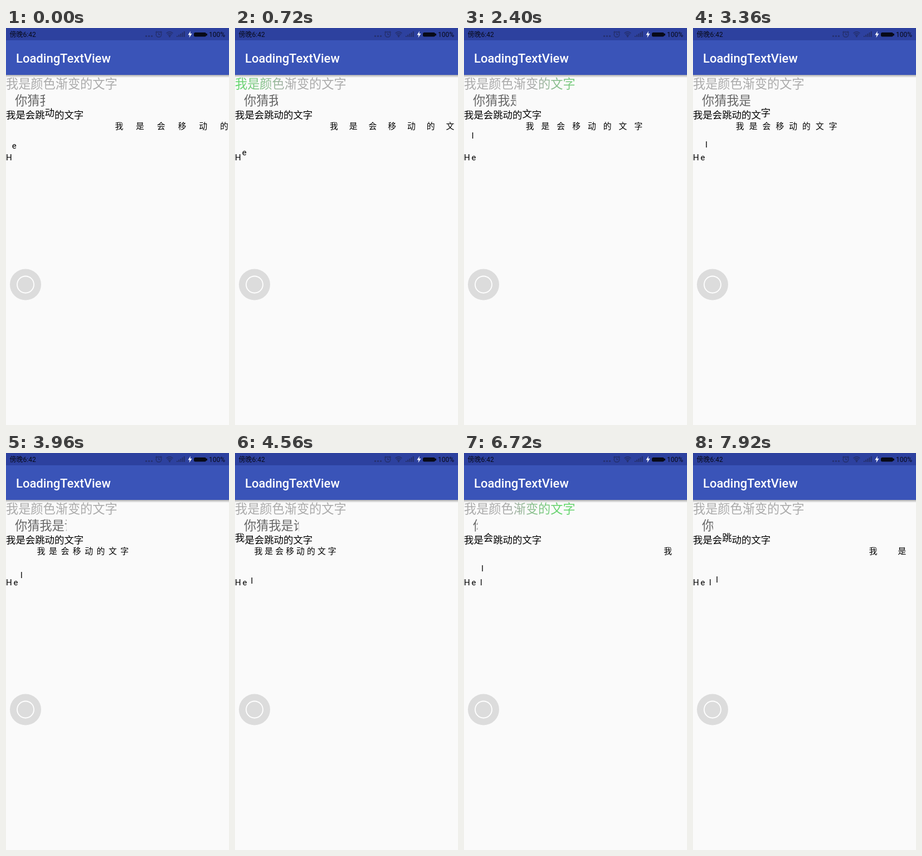
These frames come from a looping animation (400 px wide and 711 px high, 8 s). An HTML page:

```html
<!DOCTYPE html>
<html lang="zh-CN">
<head>
<meta charset="utf-8">
<title>LoadingTextView</title>
<style>
  html, body { margin: 0; width: 100%; height: 100%; overflow: hidden; background: #fafafa; }
  svg { display: block; width: 100vw; height: 100vh; }
  text { font-family: Roboto, "Noto Sans CJK SC", "Noto Sans CJK", sans-serif; white-space: pre; }
</style>
</head>
<body>
<svg viewBox="0 0 400 711">
  <defs>
    <linearGradient id="shadow" x2="0" y2="1">
      <stop stop-color="#000" stop-opacity=".3"/>
      <stop offset="1" stop-color="#000" stop-opacity="0"/>
    </linearGradient>
    <linearGradient id="shine" gradientUnits="userSpaceOnUse" y1="0" y2="0">
      <stop stop-color="#aaa"/>
      <stop offset=".5" stop-color="#5fd968"/>
      <stop offset="1" stop-color="#aaa"/>
    </linearGradient>
    <clipPath id="revealClip"><rect id="reveal" y="114" height="32"/></clipPath>
    <clipPath id="dropClip"><rect y="186" width="400" height="60"/></clipPath>
  </defs>

  <rect width="400" height="711" fill="#fafafa"/>
  <rect y="84" width="400" height="5" fill="url(#shadow)"/>
  <rect width="400" height="84" fill="#3a54b8"/>
  <rect width="400" height="22" fill="#2d419f"/>
  <text x="18" y="62" font-size="22" font-weight="500" fill="#fff">LoadingTextView</text>

  <!-- status bar -->
  <g font-size="12" fill="#080a18">
    <text x="6.5" y="16">傍晚6:42</text>
    <text x="364" y="16">100%</text>
    <rect x="337" y="8" width="22" height="7.5" rx="2.5"/>
    <rect x="359" y="10" width="2" height="3.5"/>
  </g>
  <path d="M331 5.5l-4.5 7h3l-1 5 5-7.5h-3.2z" fill="#fff"/>
  <g fill="#25306d">
    <circle cx="251.5" cy="14.5" r="1.6"/>
    <circle cx="256.5" cy="14.5" r="1.6"/>
    <circle cx="261.5" cy="14.5" r="1.6"/>
    <path d="M306 16v-2h2v2zm3.2 0v-4h2v4zm3.2 0v-6h2v6zm3.2 0v-8h2v8zm3.2 0v-10h2v10z"/>
    <circle cx="293.5" cy="15" r="1.5"/>
  </g>
  <g fill="none" stroke="#25306d" stroke-width="1.4">
    <circle cx="274" cy="11.5" r="4.8"/>
    <path d="M274 8.5v3.3h2.5M268.3 8l2.5-2.3M279.7 8l-2.5-2.3"/>
    <path d="M287.5 9.5q6-5.5 12 0M289.3 11.6q4.2-3.8 8.4 0M291 13.5q2.5-2 5 0"/>
  </g>

  <text x="0" y="108.3" font-size="22.2" fill="url(#shine)">我是颜色渐变的文字</text>
  <text x="16" y="138.3" font-size="22.2" fill="#666" clip-path="url(#revealClip)">你猜我是谁</text>
  <text id="jump" font-size="17.4">我是会跳动的文字</text>
  <text id="move" font-size="14.8">我是会移动的文字</text>
  <text id="drop" font-size="15" clip-path="url(#dropClip)">Hell</text>

  <circle cx="35" cy="459.5" r="28" fill="#dcdcdc"/>
  <circle cx="35" cy="459.5" r="15" fill="none" stroke="#fff" stroke-width="1.8"/>
</svg>
<script>
const LOOP = 8000, STEP = 120;
const $ = id => document.getElementById(id);
const mod = (a, n) => ((a % n) + n) % n;
const clamp01 = v => Math.min(1, Math.max(0, v));
const set = (id, attrs) => {
  for (const name in attrs) $(id).setAttribute(name, attrs[name]);
};
const list = (n, fn) => Array.from({ length: n }, (_, i) => fn(i).toFixed(2)).join(' ');

// A highlight sweeps through the text, then pauses out of sight.
function shine(t) {
  const center = mod(t, 4650) * 0.1333 - 97;
  set('shine', { x1: center - 100, x2: center + 100 });
}

function reveal(t) {
  set('reveal', { x: 16, width: 111 * mod((t - 5860) / 11400, 1) });
}

// Each character hops in turn.
function jump(t) {
  const beat = 1145, pos = (t + 75) / beat + 4;
  const active = Math.round(pos);
  const lift = 4 * Math.max(0, Math.cos(2 * Math.PI * (pos - active)));
  set('jump', {
    x: list(8, i => i * 17.4),
    y: list(8, i => 162 - (i === active % 8 ? lift : 0))
  });
}

// The gaps close as the line travels left.
function move(t) {
  const x = mod(195.4 - t * 0.0353, 400);
  set('move', { x: list(8, i => x + i * (14.9 + x * 0.1167)), y: 181 });
}

// Letters fall one after another along a slight curve.
function drop(t) {
  const duration = 3480, landing = [-2230, 1250, 4730, 8210], rest = [0, 13.6, 29.1, 42.6];
  const progress = i => clamp01(1 - (landing[i] - t) / duration);
  set('drop', {
    x: list(4, i => { const p = progress(i); return rest[i] * p * (1.65 - 0.65 * p); }),
    y: list(4, i => 178 + 59 * progress(i))
  });
}

function frame() {
  const t = Math.floor(performance.now() % LOOP / STEP) * STEP;
  for (const draw of [shine, reveal, jump, move, drop]) draw(t);
  requestAnimationFrame(frame);
}
frame();
</script>
</body>
</html>
```
